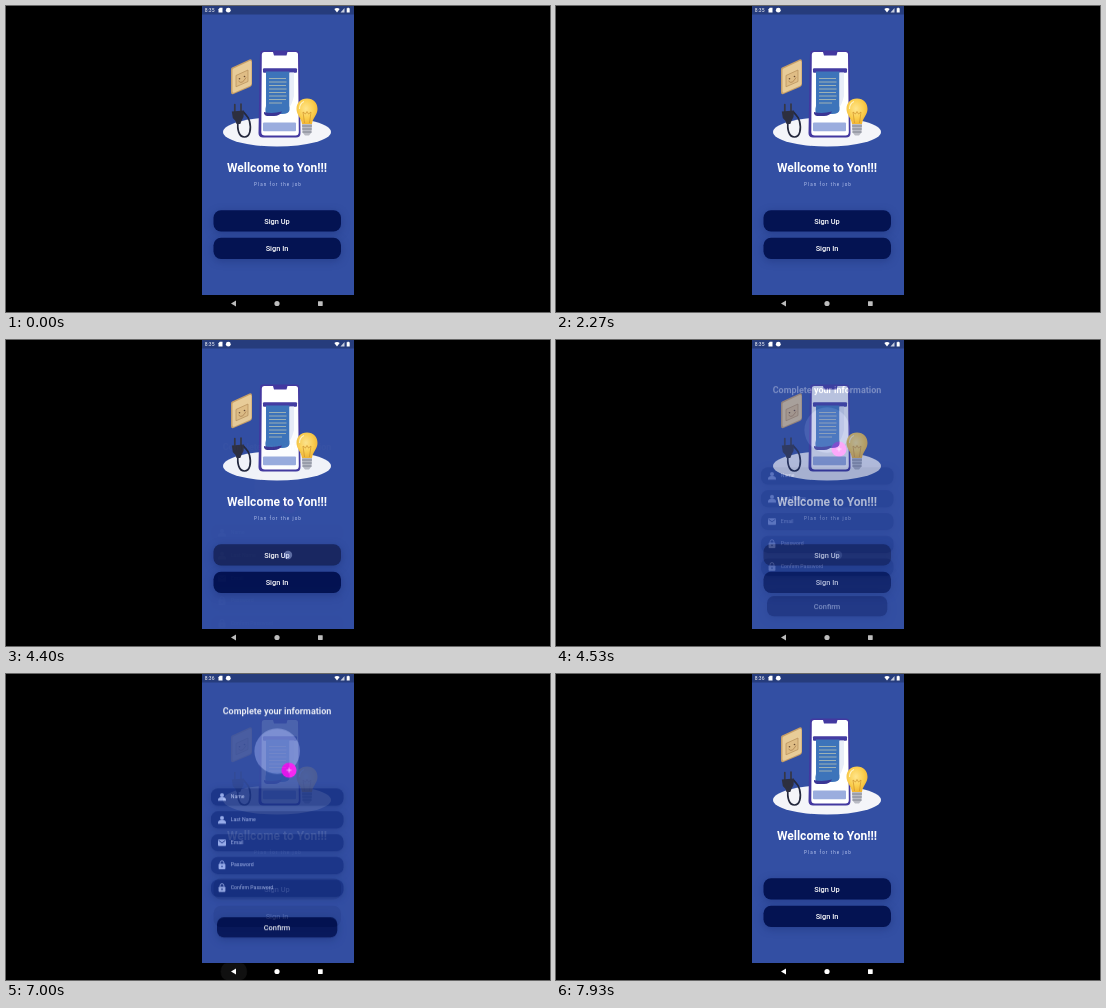
These frames come from a looping animation (544 px wide and 306 px high, 8000 ms). An HTML page:

```html
<!DOCTYPE html>
<html lang="en">
<head>
<meta charset="utf-8">
<title>Sign-up flow</title>
<style>
  html, body { margin: 0; width: 544px; height: 306px; overflow: hidden; background: #000; }
  svg { display: block; font-family: Roboto, sans-serif; }
  text { fill: #fff; }
  .mid { text-anchor: middle; }
  .title { font-weight: 700; }
  .btn text { font-size: 7.4px; font-weight: 500; text-anchor: middle; }
  .btn rect { fill: #041352; filter: drop-shadow(0 2px 4px #0617524d); }
  .field rect { fill: #193386; filter: drop-shadow(0 1px 3px #06175240); }
  .field text { font-size: 5.2px; fill: #b3c3f3; }
  .field use { fill: #a5b9f4; }

  .slide, .fade, .press, .tap, .ripple, .before, .after, .nav {
    animation: 8s linear infinite both;
  }
  .slide { animation-name: slide; }
  .fade { animation-name: fade; }
  .press { animation-name: press; }
  .tap { animation-name: tap; }
  .ripple { animation-name: ripple; transform-origin: 228px 297.5px; }
  .before { animation-name: before; }
  .after { animation-name: after; }
  .nav { animation-name: nav; }

  /* The form enters 4370-4670 ms and leaves 6980-7280 ms */
  @keyframes slide {
    0%, 54.625% { transform: translateY(72px); animation-timing-function: cubic-bezier(.4, 0, .2, 1); }
    58.375%, 87.25% { transform: none; animation-timing-function: cubic-bezier(.8, 0, .6, 1); }
    91%, 100% { transform: translateY(72px); }
  }
  @keyframes fade {
    0%, 54.625% { opacity: 0; animation-timing-function: ease-in; }
    58.375%, 87.25% { opacity: 1; animation-timing-function: ease-out; }
    91%, 100% { opacity: 0; }
  }
  @keyframes press {
    0%, 53.4% { opacity: 0; }
    54.8%, 57% { opacity: .09; }
    58.4%, 100% { opacity: 0; }
  }
  @keyframes tap {
    0%, 54% { opacity: 0; transform: none; }
    54.4%, 55.5% { opacity: .45; }
    57.5%, 100% { opacity: 0; }
  }
  @keyframes ripple {
    0%, 86.5% { opacity: 0; transform: scale(.3, 1); animation-timing-function: ease-out; }
    89%, 90.5% { opacity: 1; transform: none; }
    96%, 100% { opacity: 0; transform: none; }
  }
  @keyframes before { 0%, 86.6% { opacity: 1; } 86.61%, 100% { opacity: 0; } }
  @keyframes after { 0%, 86.6% { opacity: 0; } 86.61%, 100% { opacity: 1; } }
  @keyframes nav { 0%, 86.6% { fill: #bdbdbd; } 87.5%, 100% { fill: #fff; } }
</style>
</head>
<body>
<svg width="544" height="306" viewBox="0 0 544 306">
  <defs>
    <clipPath id="screen"><rect x="196" width="152" height="289"/></clipPath>
    <radialGradient id="glow" cx=".45" cy=".4" r=".6">
      <stop offset="0" stop-color="#ffe58c"/>
      <stop offset=".6" stop-color="#fbcf50"/>
      <stop offset="1" stop-color="#f2b632"/>
    </radialGradient>
    <g id="person">
      <circle cy="-2" r="2"/>
      <path d="M-4 3.6V2.4C-4 .6-1.8 0 0 0S4 .6 4 2.4V3.6Z"/>
    </g>
    <g id="mail">
      <rect x="-4" y="-3.2" width="8" height="6.4" rx=".8"/>
      <path d="M-3.4-2.2 0 .2 3.4-2.2" fill="none" stroke="#193386" stroke-width=".9"/>
    </g>
    <g id="lock">
      <rect x="-3.4" y="-1.4" width="6.8" height="5.4" rx=".8"/>
      <path d="M-1.9-1.2V-2.4a1.9 1.9 0 0 1 3.8 0V-1.2" fill="none" stroke="#a5b9f4" stroke-width=".9"/>
      <circle cy="1.3" r=".8" fill="#193386"/>
    </g>
  </defs>

  <g clip-path="url(#screen)">
    <rect x="196" width="152" height="289" fill="#334fa3"/>

    <!-- Welcome illustration -->
    <ellipse cx="271" cy="126" rx="54" ry="14.5" fill="#f4f5f9"/>
    <g>
      <path d="M257 44.5H290Q293.5 44.5 293.5 48L294.5 127Q294.5 131.5 290 131.5H257Q252.5 131.5 252.5 127L254 48Q254 44.5 257 44.5Z" fill="#4338a0"/>
      <path d="M258 46H267L268 49.5H280.500L281.500 46H289.500Q292 46 292 48.500L292.800 126Q292.800 129.500 289.500 129.500H259Q255.300 129.500 255.300 126L255.800 48.500Q255.800 46 258 46Z" fill="#fff"/>
      <rect x="257" y="62.300" width="34" height="4.500" rx="1" fill="#443ca2"/>
      <path d="M260 65.500H283.500V104Q283 108 276 108H262Q258 107 260 100Z" fill="#3d74ba"/>
      <path d="M283.500 66.500H288V90Q286 98 283.500 101Z" fill="#e9edf8"/>
      <path d="M258 106Q266 108 276 105.500Q274 109.800 268 110H261Q257.500 109 258 106Z" fill="#3a3594"/>
      <path d="M263 72.500H280M263 76H280.500M263 79.500H280M263 83H280.500M263 86.500H280M263 90H280.500M263 93.500H280M263 97H276" stroke="#a9b8b4" stroke-width=".9"/>
      <rect x="257" y="116.500" width="33" height="8.800" rx="1" fill="#9badde"/>
    </g>
    <g>
      <path d="M226 61.500 243.500 53.500Q246 52.800 246 55.500V78Q246 80 244 81L227.500 88Q225 88.800 225 86V63.500Q225 62 226 61.500Z" fill="#c79f67"/>
      <path d="M227.500 62.500 243.500 55Q245.500 54.200 245.500 56.500V77Q245.500 79 244 79.700L228.500 86.500Q226.500 87.200 226.500 85V64Q226.500 63 227.500 62.500Z" fill="#e8cc98"/>
      <path d="M230 69.500 242 64V75.500L230 80.800Z" fill="#dfbd85" stroke="#b78f59" stroke-width=".7"/>
      <path d="M232.500 75Q236 79 240 71.500" fill="none" stroke="#a67a48" stroke-width=".7"/>
      <circle cx="233.500" cy="72.800" r=".8" fill="#694c32"/>
      <circle cx="238.500" cy="70.500" r=".8" fill="#694c32"/>
    </g>
    <g fill="none" stroke="#24283c" stroke-linecap="round">
      <path d="M232 115C231 124 233 131 238.500 131C244 131 245.500 123 243.500 115C242.500 110 239.500 109 237.500 106" stroke-width="1.700"/>
      <path d="M228.800 98.500V106M235 98V106" stroke="#363743" stroke-width="1.700"/>
      <path d="M225.800 105.500 238 104.500 237.500 111Q235.500 114.500 234.300 118H230.500Q229.500 114 226.800 112Z" fill="#2d2f40" stroke="none"/>
    </g>
    <g>
      <path d="M296 117H306L305.500 126.500 303 129.500H299L296.500 126.500Z" fill="#b9bbc4"/>
      <path d="M296 120H306M296.200 123H305.800M296.500 126H305.500" stroke="#777b88" stroke-width=".9"/>
      <path d="M301 92.500C307.500 92.500 311.500 97 311.500 103C311.500 109 306.500 112 306 118H296C295.500 112 290.500 109 290.500 103C290.500 97 294.500 92.500 301 92.500Z" fill="url(#glow)"/>
      <path d="M298.500 117 297 106 299.500 108 301 105.500 302.500 108 305 106 303.500 117" fill="none" stroke="#cf922d" stroke-width=".7"/>
      <path d="M293.500 103Q293.500 97.500 298 95.500" fill="none" stroke="#fff3c2" stroke-width="1.200"/>
    </g>

    <text class="title mid" x="271" y="166.300" font-size="12">Wellcome to Yon!!!</text>
    <text x="248" y="180" font-size="4.500" letter-spacing="1.100" style="fill:#b9c7f0">Plan for the job</text>
    <g class="btn">
      <rect x="207.500" y="204.300" width="127.500" height="21.200" rx="7.500"/>
      <rect x="207.500" y="231.800" width="127.500" height="21.200" rx="7.500"/>
      <rect class="press" x="207.500" y="204.300" width="127.500" height="21.200" rx="7.500" style="fill:#fff;filter:none"/>
      <text x="271" y="217.600">Sign Up</text>
      <text x="271" y="245.100">Sign In</text>
    </g>
    <circle class="tap" cx="282" cy="215" r="4.200" fill="#b3c4f6"/>

    <!-- Registration form -->
    <g class="fade"><g class="slide">
      <rect x="196" width="152" height="289" fill="#334fa3"/>
      <text class="title mid" x="271" y="40.300" font-size="9">Complete your information</text>
      <circle cx="271.200" cy="77" r="22.800" fill="#6b81cc"/>
      <circle cx="283" cy="96" r="7.600" fill="#f50cf0"/>
      <path d="M280.500 96H285.500M283 93.500V98.500" stroke="#ffd0ff" stroke-width=".8"/>
      <g class="field">
        <rect x="205" y="114.300" width="132.500" height="17.200" rx="7"/>
        <use href="#person" x="216" y="123"/>
        <text x="224.700" y="124">Name</text>
      </g>
      <g class="field">
        <rect x="205" y="137.100" width="132.500" height="17.200" rx="7"/>
        <use href="#person" x="216" y="145.800"/>
        <text x="224.700" y="146.800">Last Name</text>
      </g>
      <g class="field">
        <rect x="205" y="159.900" width="132.500" height="17.200" rx="7"/>
        <use href="#mail" x="216" y="168.500"/>
        <text x="224.700" y="169.600">Email</text>
      </g>
      <g class="field">
        <rect x="205" y="182.700" width="132.500" height="17.200" rx="7"/>
        <use href="#lock" x="216" y="191"/>
        <text x="224.700" y="192.400">Password</text>
      </g>
      <g class="field">
        <rect x="205" y="205.500" width="132.500" height="17.200" rx="7"/>
        <use href="#lock" x="216" y="213.800"/>
        <text x="224.700" y="215.200">Confirm Password</text>
      </g>
      <g class="btn">
        <rect x="211" y="243" width="120.300" height="20.200" rx="7"/>
        <text x="271" y="255.700">Confirm</text>
      </g>
    </g></g>

    <!-- Status bar -->
    <rect x="196" width="152" height="8.500" fill="#263c7c"/>
    <g font-size="5">
      <text class="before" x="198.800" y="6">8:35</text>
      <text class="after" x="198.800" y="6">8:36</text>
    </g>
    <g fill="#fff">
      <path d="M213.800 1.800H216.500V6.500H212.500V3.200Z"/>
      <circle cx="222.300" cy="4.200" r="2.400"/>
      <path d="M328.300 3Q331 1 333.700 3L331 6.500Z"/>
      <path d="M334.500 6.500 338.500 2V6.500Z" opacity=".75"/>
      <path d="M340.700 2.300H341.500V1.700H342.900V2.300H343.700V6.500H340.700Z"/>
    </g>
  </g>

  <!-- Navigation bar -->
  <rect class="ripple" x="209" y="289.300" width="37.500" height="16.700" rx="8.300" fill="#1c1c1c"/>
  <g class="nav">
    <path d="M225 297.500 230 294.500V300.500Z"/>
    <circle cx="271" cy="297.500" r="2.600"/>
    <rect x="312" y="295.200" width="4.700" height="4.700" rx=".4"/>
  </g>
</svg>
</body>
</html>
```
